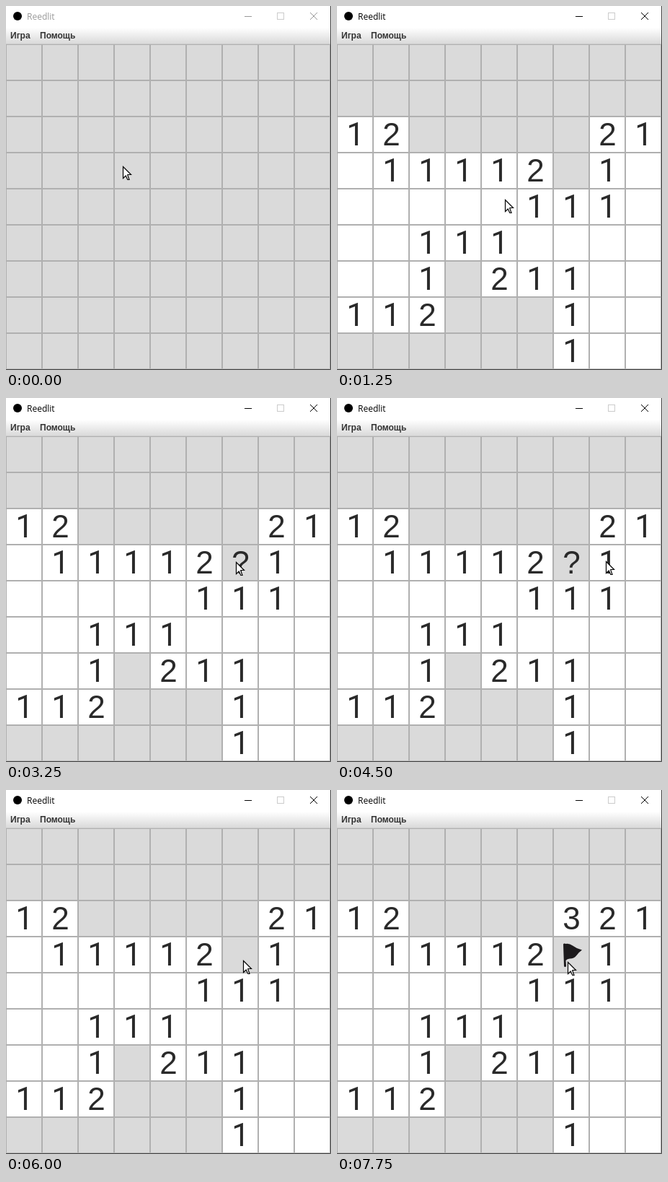
These frames come from a looping animation (451x504 px, 8000 ms). An HTML page:

```html
<!DOCTYPE html>
<html lang="ru">
<head>
<meta charset="utf-8">
<title>Reedlit</title>
<style>
  html, body { margin: 0; width: 100%; height: 100%; overflow: hidden; background: #fff; }
  svg { display: block; width: 451px; height: 504px; }
  .title { font: 12px "Open Sans", "Noto Sans", sans-serif; }
  .menu { font: bold 12px "Liberation Sans", Arial, sans-serif; fill: #333; }
  .digit { font: 44px "Liberation Sans", Arial, sans-serif; fill: #2a2a2a; text-anchor: middle; }
  .one { font-family: Roboto, sans-serif; }
</style>
</head>
<body>
<svg viewBox="0 0 451 504">
  <defs>
    <linearGradient id="bar" x1="0" y1="0" x2="0" y2="1">
      <stop offset="0" stop-color="#fff"/>
      <stop offset="1" stop-color="#dadada"/>
    </linearGradient>
  </defs>
  <rect width="451" height="504" fill="#fff"/>
  <circle cx="16" cy="14" r="6" fill="#000"/>
  <g id="caption">
    <text class="title" x="29" y="19" stroke="none">Reedlit</text>
    <path d="M331 14.5h10M422 9l10 10M432 9l-10 10" fill="none"/>
  </g>
  <rect x="376.5" y="9.5" width="9" height="9" fill="none" stroke="#ccc"/>
  <rect y="30" width="450" height="22" fill="url(#bar)"/>
  <rect y="52" width="450" height="1" fill="#ccc"/>
  <text class="menu" x="6" y="45">Игра</text>
  <text class="menu" x="47" y="45">Помощь</text>
  <rect y="53" width="450" height="450" fill="#b0b0b0"/>
  <g id="board"></g>
  <path id="flag" fill="#1c1a1c" d="M314 213.5Q315 212 317.5 213Q322 212 327 215.5Q333 220 340 221.5Q335 225 332 229.5Q329 233.5 323 233.5Q319.5 233.5 317.5 236L318 243.5Q318 245 316.5 245Q315 245 315 243.5Z"/>
  <path d="M450.5 0V503.5H0" fill="none" stroke="#444"/>
  <path id="cursor" fill="#fff" stroke="#000" stroke-width="1.2" d="M.5 .5V16.5L4.2 13L6.8 18.5H9L6.8 12.2V11.5H11.5Z"/>
</svg>
<script>
  const STEP = 250, LOOP = 8000, SIZE = 9, CELL = 50, TOP = 53;
  const mines = new Set([9, 16, 20, 23, 33, 57, 68, 73]);
  const $ = id => document.getElementById(id);

  function add(tag, attrs, text = "") {
    const el = document.createElementNS("http://www.w3.org/2000/svg", tag);
    for (const key in attrs) el.setAttribute(key, attrs[key]);
    el.textContent = text;
    return $("board").appendChild(el);
  }

  function addDigit(x, y, text) {
    const style = text === 1 ? "digit one" : "digit";
    return add("text", { class: style, x: x + 25.5, y: y + 40 }, text);
  }

  function neighbours(cell) {
    return cells.filter(other => other !== cell &&
      Math.abs(other.col - cell.col) < 2 && Math.abs(other.row - cell.row) < 2);
  }

  const cells = Array.from({ length: SIZE * SIZE }, (_, i) => ({
    col: i % SIZE, row: Math.floor(i / SIZE), mine: mines.has(i), opens: Infinity
  }));

  for (const cell of cells) {
    const x = cell.col * CELL, y = TOP + cell.row * CELL;
    cell.count = neighbours(cell).filter(other => other.mine).length;
    cell.rect = add("rect", { x: x + 1, y: y + 1, width: CELL - 2, height: CELL - 2 });
    cell.text = addDigit(x, y, cell.count || "");
  }
  const question = addDigit(6 * CELL, TOP + 3 * CELL, "?");

  // The game is recorded once, one cursor place and mark per step.
  const path = [[162, 222]];
  const marks = [""];
  const now = () => path.length - 1;

  function go(steps, x, y) {
    const [x0, y0] = path[now()];
    for (let i = 1; i <= steps; i++) {
      const u = i / steps, k = u * (1.2 - 0.2 * u);
      path.push([x0 + (x - x0) * k, y0 + (y - y0) * k]);
      marks.push(marks.at(-1));
    }
  }
  const rest = steps => go(steps, ...path[now()]);
  const mark = value => { marks[now()] = value; };

  function open(cell) {
    if (cell.opens < Infinity) return;
    cell.opens = now();
    if (!cell.count) neighbours(cell).forEach(open);
  }
  const click = (col, row) => open(cells[row * SIZE + col]);

  rest(1);
  click(3, 3);
  rest(1);
  go(3, 233, 268);
  click(4, 4);
  rest(2);
  go(3, 319, 227);
  rest(1);
  mark("flag");
  rest(2);
  mark("?");
  rest(2);
  go(2, 391, 229);
  go(1, 373, 226);
  go(1, 372, 267);
  go(2, 318, 277);
  rest(1);
  go(1, 329, 236);
  rest(1);
  mark("");
  rest(2);
  mark("flag");
  go(2, 386, 233);
  click(6, 2);
  go(2, 371, 250);
  go(1, 320, 238);

  const show = (el, on) => el.setAttribute("visibility", on ? "visible" : "hidden");

  function draw(time) {
    const step = Math.floor(time / STEP);
    const ink = step < 1 ? "#999" : "#000";
    $("caption").setAttribute("fill", ink);
    $("caption").setAttribute("stroke", ink);

    for (const { rect, text, opens } of cells) {
      rect.setAttribute("fill", step >= opens ? "#fff" : "#dadada");
      show(text, step >= opens);
    }
    show($("flag"), marks[step] === "flag");
    show(question, marks[step] === "?");

    const [x, y] = path[step].map(Math.round);
    $("cursor").setAttribute("transform", `translate(${x} ${y})`);
  }

  let start;
  function tick(time) {
    start ??= time;
    draw(Math.max(0, time - start) % LOOP);
    requestAnimationFrame(tick);
  }
  draw(0);
  requestAnimationFrame(tick);
</script>
</body>
</html>
```
